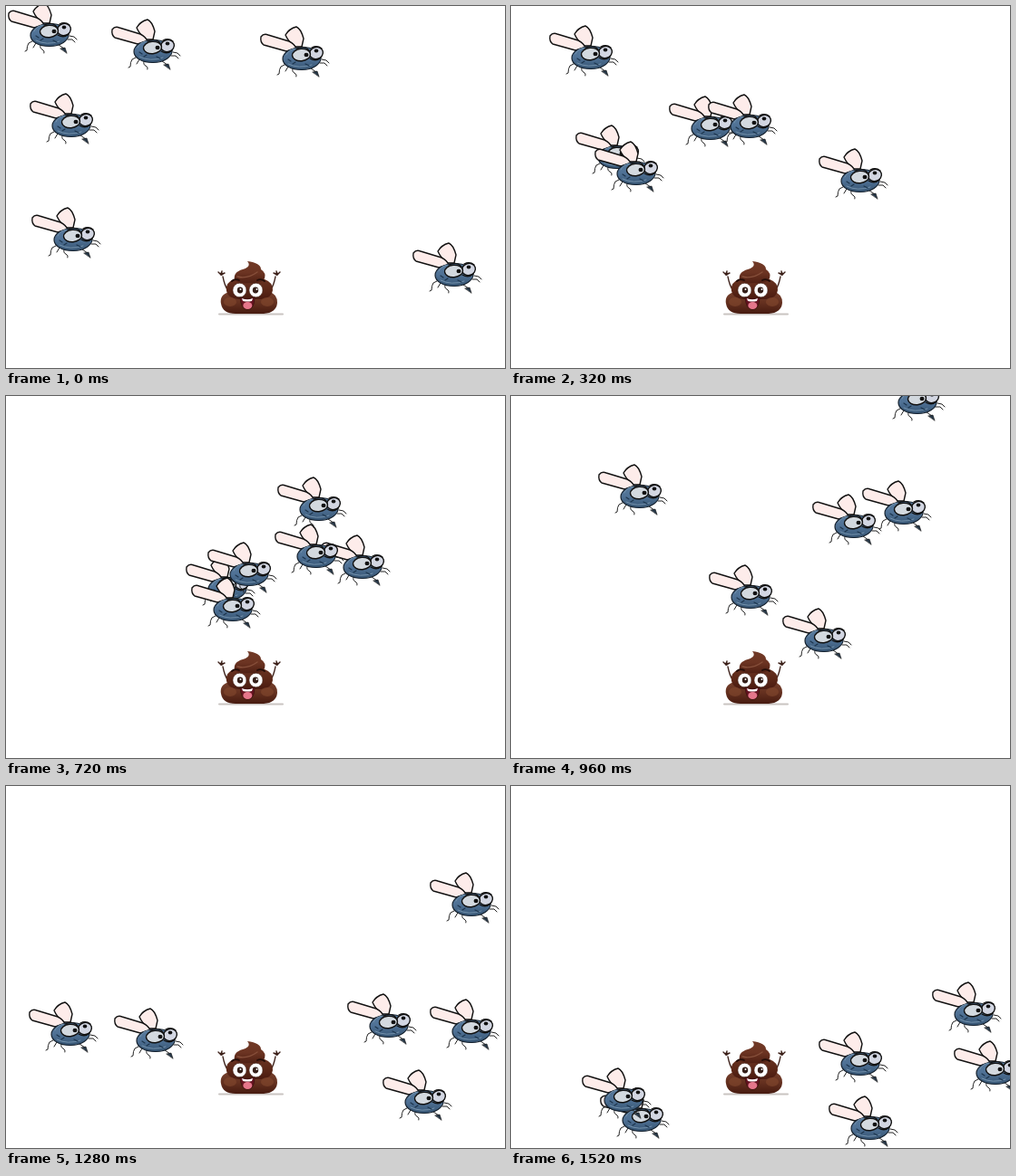
Animation of 550 by 400 pixels, one loop 1.6 s. Source, as an HTML page with a canvas:

```html
<!DOCTYPE html>
<html lang="en">
<head>
<meta charset="utf-8">
<title>Flies</title>
<style>
html, body { margin: 0; width: 100%; height: 100%; overflow: hidden; background: #fff; }
canvas { display: block; }
</style>
</head>
<body>
<canvas id="stage" width="550" height="400"></canvas>
<script>
const ctx = document.getElementById('stage').getContext('2d');
const STEP = 80, STEPS = 20;

// Waypoints are top-left corners, reached at these steps; flies are listed back to front.
const keySteps = [0, 4, 9, 12, 14, 17, 19];
const flies = [
  [[448, 262], [339, 158], [347, 154], [387, 94], [416, 164], [493, 272], [488, 282]],
  [[26, 97], [71, 132], [198, 178], [96, 76], [92, 199], [-9, 259], [98, 334]],
  [[116, 15], [174, 100], [296, 142], [332, 109], [326, 210], [401, 240], [339, 272]],
  [[280, 23], [217, 98], [299, 90], [402, -28], [446, 87], [478, 100], [464, 217]],
  [[2, -3], [42, 22], [222, 162], [218, 187], [138, 199], [110, 269], [78, 312]],
  [[28, 223], [92, 150], [204, 201], [299, 235], [344, 295], [450, 323], [350, 343]]
];

function shape(d, fill, stroke, width = 1) {
  const path = new Path2D(d);
  if (fill) { ctx.fillStyle = fill; ctx.fill(path); }
  if (stroke) { ctx.strokeStyle = stroke; ctx.lineWidth = width; ctx.stroke(path); }
}

function oval(x, y, rx, ry, fill, stroke, width = 1, turn = 0) {
  ctx.beginPath();
  ctx.ellipse(x, y, rx, ry, turn, 0, Math.PI * 2);
  if (fill) { ctx.fillStyle = fill; ctx.fill(); }
  if (stroke) { ctx.strokeStyle = stroke; ctx.lineWidth = width; ctx.stroke(); }
}

function blend(y0, y1, ...colors) {
  const g = ctx.createLinearGradient(0, y0, 0, y1);
  colors.forEach((c, i) => g.addColorStop(i / (colors.length - 1), c));
  return g;
}

function drawFly(x, y) {
  ctx.save();
  ctx.translate(x, y);
  // Wings
  shape('M46 22L48 13Q45 2 40 0Q32 2 28 9Q31 16 38 22Z', '#fdecea', '#111', 1.4);
  shape('M29 27L4 20Q0 17 1 11Q4 7 9 9L32 16Q38 19 40 24Z', '#fdecea', '#111', 1.4);
  // Legs
  shape('M27 42L23 44Q21 47 21 52L19 53M36 46Q35 50 38 51Q41 53 40 55M31 44L28 49',
    null, '#222');
  shape('M56 46L62 50M68 36L73 37L76 40M66 40L71 40L74 43', null, '#222');
  shape('M58 50L63 49L65 55Z', '#263747', '#111', .6);
  // Body
  oval(46, 35, 21, 12.5, blend(22, 48, '#597b9d', '#4f7195', '#355371'), '#14202d', 1.2, -.03);
  shape('M29 31Q31 25 39 24M31 41Q43 47 57 42', null, '#7593ad', 1);
  shape('M31 36L34 38M36 41L39 39M50 41L54 43', null, '#1d354d', 1.2);
  // Head
  oval(62, 29, 7.5, 6.5, '#d2d6e2', '#111', 1.4, -.3);
  oval(45.5, 31, 10, 6.7, '#d3d9df', '#111', 1.4, -.08);
  oval(51, 31, 2.5, 2.2, '#111');
  oval(62, 26.5, 2.3, 2, '#111');
  shape('M55 35Q62 39 67 34', null, '#111', 1.3);
  shape('M40 24Q49 20 54 26M57 23Q63 20 68 24', null, '#111', 1.3);
  ctx.restore();
}

function drawPile() {
  shape('M235 340.5H305', null, '#c9c4c1', 2);
  // Arms and hands
  for (const [x, side] of [[237, 1], [299, -1]]) {
    ctx.save();
    ctx.translate(x, 296);
    ctx.scale(side, 1);
    shape('M7 17Q4 13 2 3', null, '#3c2019', 1.3);
    shape('M-3 -2L0 1L1 -3M0 1L4 -1', null, '#3c2019', 1.4);
    oval(.5, 0, 1.7, 1.7, '#3c2019');
    ctx.restore();
  }
  // Stacked coils
  shape('M246 316Q235 319 237 329Q239 340 253 340H284Q298 339 299 328Q299 318 290 316Z',
    blend(315, 341, '#75402d', '#64301f', '#44190f'));
  shape('M251 302Q241 306 243 315Q245 323 256 324H281Q293 323 294 314Q294 305 285 302Z',
    blend(301, 325, '#683322', '#5c2818', '#48190f'));
  shape('M266 282Q271 288 261 291Q250 294 252 303Q258 307 268 306Q283 307 285 301Q287 295 281 291Q281 284 266 282Z',
    blend(282, 307, '#713a28', '#6c3422', '#4d1f13'));
  shape('M255 299Q266 302 277 294', null, '#87503b', 1.3);
  oval(247, 327, 7, 5, '#84492f99');
  oval(288, 327, 7, 5, '#84492f99');
  // Face
  shape('M249 304Q252 301 257 303M277 303Q281 301 285 304', null, '#230d08', 1.8);
  for (const x of [257.5, 275.5]) {
    oval(x, 314, 7.6, 7.8, '#fff', '#3b1b12', .6);
    oval(x + (x < 266 ? .5 : -.5), 314, 3.2, 3.4, '#35201a');
    oval(x + 1, 313, 1, 1, '#fff');
  }
  shape('M258 322Q266 325 274 322Q274 335 266 335.5Q259 335 258 322Z', '#641320', '#35130d', .7);
  shape('M260 323Q266 325.5 272 323L271 326Q266 327 261 326Z', '#fff');
  oval(266.3, 331, 5, 4, '#e5768b');
}

function place(points, step) {
  let i = 0;
  while (i < keySteps.length - 2 && step >= keySteps[i + 1]) i++;
  const t = (step - keySteps[i]) / (keySteps[i + 1] - keySteps[i]);
  return points[i].map((v, axis) => Math.round(v + (points[i + 1][axis] - v) * t));
}

function render(now) {
  const step = Math.floor(now / STEP) % STEPS;
  ctx.fillStyle = '#fff';
  ctx.fillRect(0, 0, 550, 400);
  ctx.lineCap = ctx.lineJoin = 'round';
  drawPile();
  for (const points of flies) drawFly(...place(points, step));
}

let start;
function tick(now) {
  start ??= now;
  render(now - start);
  requestAnimationFrame(tick);
}
render(0);
requestAnimationFrame(tick);
</script>
</body>
</html>
```
